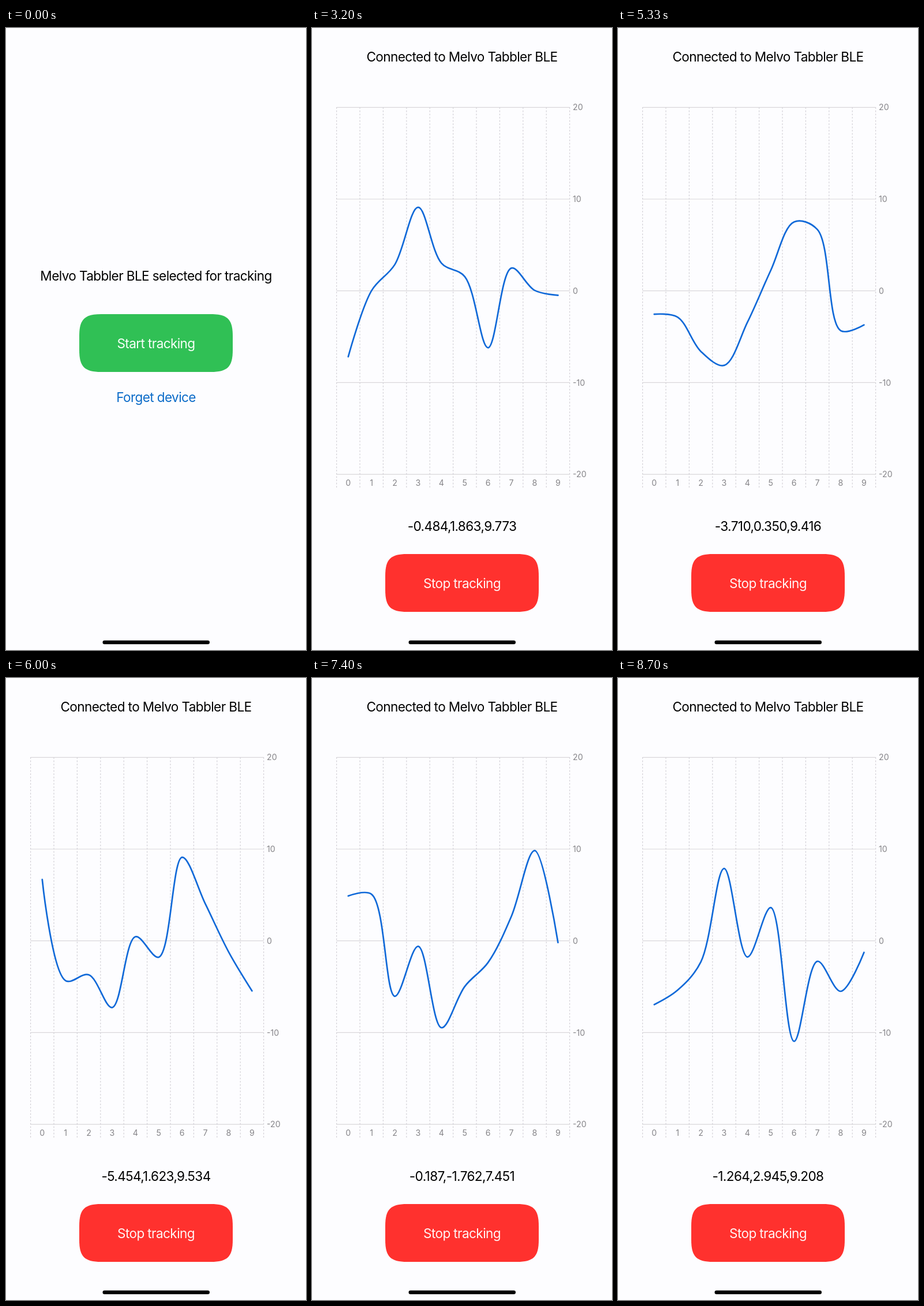
An HTML page that plays this animation: 520 px wide and 1076 px high, repeating every 8730 ms.

```html
<!DOCTYPE html>
<html lang="en">
<head>
<meta charset="utf-8">
<title>Tracker</title>
<style>
  html, body { margin: 0; width: 100%; height: 100%; overflow: hidden; background: #fdfdff; }
  svg { display: block; width: 100%; height: 100%; }
  text { font: 22.6px Inter, "Open Sans", sans-serif; letter-spacing: -.62px; text-anchor: middle; }
  .axis text { font-size: 14.2px; letter-spacing: 0; fill: #858488; }
  .axis path { fill: none; stroke: #d9d7da; stroke-width: 1.2; }
  .axis .dash { stroke: #d2d0d6; stroke-dasharray: 2.8 2.8; }
  .spin line { stroke: #7c7888; stroke-width: 3.4; stroke-linecap: round; }
  #curve { fill: none; stroke: #1069d8; stroke-width: 2.7; stroke-linecap: round; stroke-linejoin: round; }
</style>
</head>
<body>
<svg viewBox="0 0 520 1076">
  <g id="idle">
    <text x="260" y="436.5">Melvo Tabbler BLE selected for tracking</text>
    <path class="button" transform="translate(127 495)" fill="#30c055"/>
    <text x="260" y="553.5" fill="#f8fff9">Start tracking</text>
    <text x="260" y="647" fill="#0b6bc8">Forget device</text>
  </g>
  <g id="connecting">
    <g class="spin" id="spin"></g>
    <text x="260" y="549" fill="#818184">Connecting to Melvo Tabbler BLE</text>
  </g>
  <g id="live">
    <text x="260" y="57.5">Connected to Melvo Tabbler BLE</text>
    <g class="axis" id="axis"></g>
    <path id="curve"/>
    <text x="260" y="869.5" id="reading"></text>
    <path class="button" transform="translate(127 910)" fill="#ff312e"/>
    <text x="260" y="968.5" fill="#fff5f4">Stop tracking</text>
  </g>
  <rect x="167.5" y="1059.5" width="185.5" height="6.6" rx="3.3"/>
</svg>
<script>
const $ = id => document.getElementById(id);
const LOOP = 8730, CONNECT = 1000, LIVE = 1970, STEP = 100, FIRST = 20;

// Acceleration along x, one sample per step
const samples = [
  -1.214, -3.437, -5.592,
  -7.18, 0.02, 2.87, 9.11, 3.02, 1.55, -6.2, 2.48, 0.05, -0.484,
  -1.913, -3.228, -1.146, 0.817,
  0.54, 0.04, 1.31, -0.72, 1.93, 3.72, 6.12, -2.55, -2.86, -6.598,
  -8.123, -3.418, 2.236, 7.514,
  6.68, -4.34, -3.71, -7.27, 0.45, -1.78, 9.11, 4.02, -1.22, -5.454,
  -7.612, -4.135, 0.927, 3.841,
  4.89, 5.08, -6.04, -0.59, -9.47, -4.97, -2.36, 2.68, 9.83, -0.187,
  -3.243, -6.117, -8.026,
  -6.95, -5.38, -2.29, 7.88, -1.76, 3.63, -10.95, -2.23, -5.5, -1.264
];
// [step, y, z]
const others = [[20, .412, 9.618], [32, 1.863, 9.773], [46, .876, 9.299],
  [60, 1.623, 9.534], [74, -1.762, 7.451], [87, 2.945, 9.208]];

const colX = i => 62.8 + 40.4 * i;
const valY = v => 454.7 - 15.87 * v;

function buttonPath(w, h, e = 38, k = 9) {
  return `M${e} 0H${w - e}C${w - k} 0 ${w} ${k} ${w} ${e}V${h - e}C${w} ${h - k} ${w - k} ${h} ${w - e} ${h}` +
    `H${e}C${k} ${h} 0 ${h - k} 0 ${h - e}V${e}C0 ${k} ${k} 0 ${e} 0Z`;
}

function buildAxis() {
  let s = "";
  for (let v = -20; v <= 20; v += 10)
    s += `<path d="M42.6 ${valY(v)}H446.6"/><text x="452" y="${valY(v) + 5.1}" style="text-anchor:start">${v}</text>`;
  for (let i = 0; i <= 10; i++) {
    s += `<path class="dash" d="M${42.6 + 40.4 * i} 137V796"/>`;
    if (i < 10) s += `<text x="${colX(i)}" y="791.5">${i}</text>`;
  }
  $("axis").innerHTML = s;
}

// Centripetal Catmull-Rom spline
function spline(pts) {
  const dist = (a, b) => Math.sqrt(Math.hypot(b[0] - a[0], b[1] - a[1]));
  const handle = (i, dir) => {
    const p = pts[i], a = pts[i - 1], b = pts[i + 1];
    if (!a || !b) return p;
    const da = dist(a, p), db = dist(p, b), len = dir > 0 ? db : da;
    return p.map((c, n) => {
      const m = (c - a[n]) / da - (b[n] - a[n]) / (da + db) + (b[n] - c) / db;
      return c + dir * m * len / 3;
    });
  };
  let d = "M" + pts[0];
  for (let i = 1; i < pts.length; i++) d += `C${handle(i - 1, 1)} ${handle(i, -1)} ${pts[i]}`;
  return d;
}

function reading(step) {
  let i = 0;
  while (i < others.length - 2 && step > others[i + 1][0]) i++;
  const a = others[i], b = others[i + 1], f = (step - a[0]) / (b[0] - a[0]);
  const mix = n => a[n] + (b[n] - a[n]) * f + Math.sin(Math.PI * f * (n + 2)) * .9;
  return [samples[step - FIRST], mix(1), mix(2)].map(v => v.toFixed(3)).join(",");
}

function draw(t) {
  const screen = t < CONNECT ? "idle" : t < LIVE ? "connecting" : "live";
  for (const id of ["idle", "connecting", "live"]) $(id).style.display = id === screen ? "" : "none";

  const head = Math.floor(t / 125) + 5;
  [...$("spin").children].forEach((spoke, i) =>
    spoke.setAttribute("opacity", Math.max(.24, .9 - .13 * ((head - i) % 8))));

  if (screen === "live") {
    const step = Math.min(87, Math.floor((t + 30) / STEP));
    const pts = Array.from({ length: 10 }, (_, i) => [colX(i), valY(samples[step - 9 + i - FIRST] || 0)]);
    $("curve").setAttribute("d", spline(pts));
    $("reading").textContent = reading(step);
  }
}

document.querySelectorAll(".button").forEach(b => b.setAttribute("d", buttonPath(266, 100)));
for (let i = 0; i < 8; i++)
  $("spin").innerHTML += `<line y1="-6.2" y2="-11.7" transform="translate(260 504.5) rotate(${45 * i})"/>`;
buildAxis();

const start = performance.now();
function frame() {
  draw((performance.now() - start) % LOOP);
  requestAnimationFrame(frame);
}
frame();
</script>
</body>
</html>
```
